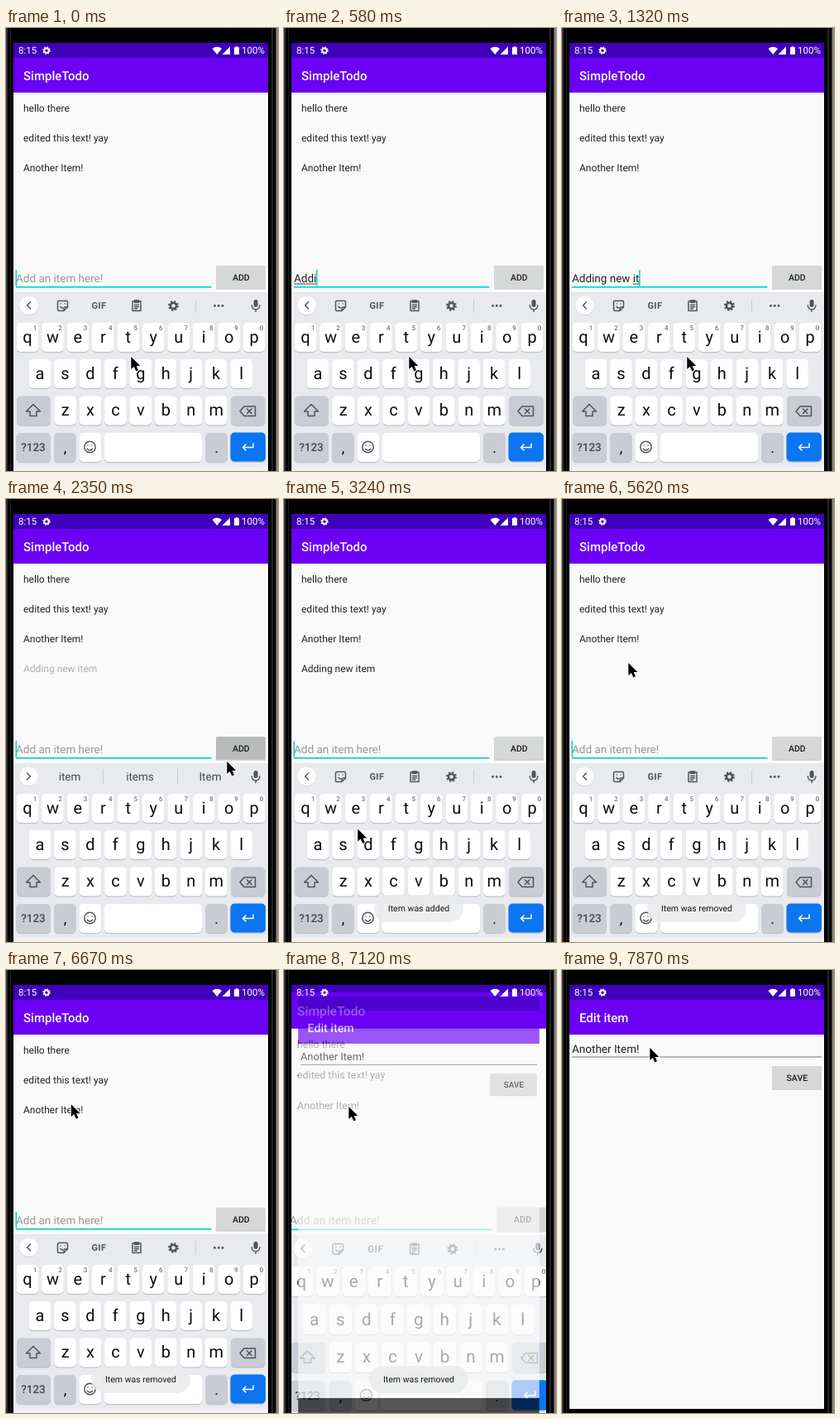
These frames come from a looping animation (329 px wide and 535 px high, 8 s). An HTML page:

```html
<!DOCTYPE html>
<html lang="en">
<head>
<meta charset="utf-8">
<title>Todo list</title>
<style>
  html, body { margin: 0; width: 100%; height: 100%; overflow: hidden; background: #000; }
  svg { display: block; width: 329px; height: 535px; font-family: Roboto, "Noto Sans", sans-serif; }
  text { white-space: pre; text-rendering: geometricPrecision; }
  .mid { text-anchor: middle; }
  .title { font-size: 15px; font-weight: 500; fill: #fff; }
  .row { font-size: 12px; fill: #212121; }
  .field { font-size: 13.5px; fill: #212121; }
  .button { font-size: 10.5px; font-weight: 500; fill: #1c1c1c; text-anchor: middle; }
  .status { font-size: 11.5px; fill: #fff; }
  .toast { font-size: 10.5px; fill: #151515; text-anchor: middle; }
  .letter { font-size: 20px; fill: #0c0c0c; text-anchor: middle; }
  .mark { font-size: 18px; }
  .digit { font-size: 8px; fill: #4c4f54; text-anchor: middle; }
  .word { font-size: 13.5px; fill: #45484d; text-anchor: middle; }
  .line { fill: none; stroke: #50545a; stroke-width: 1.5; stroke-linejoin: round; stroke-linecap: round; }
</style>
</head>
<body>
<svg viewBox="0 0 329 535" xmlns="http://www.w3.org/2000/svg">
  <defs>
    <clipPath id="screen"><rect x="9" y="18" width="308" height="517"/></clipPath>
    <linearGradient id="shade" x2="0" y2="1">
      <stop offset="0" stop-color="#000" stop-opacity=".1"/>
      <stop offset="1" stop-color="#000" stop-opacity="0"/>
    </linearGradient>
    <g id="gear" fill="none" stroke="currentColor">
      <circle r="3.1" stroke-width="2.2"/>
      <circle r="4.6" stroke-width="1.8" stroke-dasharray="1.8 1.813"/>
    </g>
    <g id="bars">
      <rect x="9" y="18" width="308" height="18" fill="#4000ba"/>
      <rect x="9" y="36" width="308" height="42" fill="#6b00f5"/>
      <rect x="9" y="78" width="308" height="3" fill="url(#shade)"/>
    </g>
    <g id="plate">
      <rect x="254" y="1" width="60" height="28" rx="1.5" fill="#000" opacity=".16"/>
      <rect x="254" width="60" height="27.5" rx="1.5" fill="currentColor"/>
    </g>
  </defs>

  <rect width="329" height="535"/>
  <rect width="2" height="535" fill="#333"/>
  <rect x="5" width="1" height="535" fill="#1f1f1f"/>
  <rect x="321" width="2" height="535" fill="#262626"/>
  <rect x="326.5" width="2.5" height="535" fill="#858585"/>

  <g clip-path="url(#screen)">
    <g id="list">
      <rect x="9" y="78" width="308" height="457" fill="#fafafa"/>
      <use href="#bars"/>
      <text class="title" x="21" y="63">SimpleTodo</text>
      <text class="row" x="21" y="100.5">hello there</text>
      <text class="row" x="21" y="136.5">edited this text! yay</text>
      <text class="row" x="21" y="172.5">Another Item!</text>
      <text class="row" x="21" y="208.5" id="added">Adding new item</text>
      <text class="field" x="12" y="306.5" id="hint" style="fill:#989898">Add an item here!</text>
      <text class="field" x="12" y="306.5" id="typed"></text>
      <rect id="compose" y="308.5" height="1" fill="#444"/>
      <rect x="12" y="312" width="236.5" height="1.7" fill="#03d8c6"/>
      <rect id="caret" y="292" width="1.6" height="19.5" fill="#03d8c6"/>
      <g id="add" color="#d6d7d7"><use href="#plate" y="287"/></g>
      <text class="button" x="284.3" y="304.8">ADD</text>

      <rect x="9" y="319" width="308" height="216" fill="#e8eaed"/>
      <rect x="9" y="530" width="308" height="5" fill="#f1f2f4"/>
      <circle cx="27.5" cy="335.5" r="11.5" fill="#c9ccd0"/>
      <circle cx="27.5" cy="335" r="11.3" fill="#fff"/>
      <path class="line" id="chevron"/>

      <g id="tools">
        <path class="line" d="M64 329.5h9q1.5 0 1.5 1.5v6l-4.500 4.500h-6q-1.500 0-1.500-1.500v-9q0-1.500 1.500-1.500zM74 337h-2.500q-1.500 0-1.500 1.500v2.500M66 336.500q1 1.500 2.500 1.500M66.300 333v.1M71 333v.1"/>
        <text class="mid" x="112.5" y="339" font-size="11" font-weight="700" letter-spacing=".5" fill="#50545a">GIF</text>
        <path class="line" d="M153 330h10v11.500h-10zM155.500 329h5v2.500h-5zM155.500 334.500h5M155.500 336.800h5M155.500 339h3"/>
        <g color="#50545a"><use href="#gear" transform="translate(202.5 335.5) scale(1.16)"/></g>
        <path d="M229.5 327v17" stroke="#cbced2"/>
        <path d="M252.5 335.5h.01m4.700 0h.01m4.700 0h.01" stroke="#50545a" stroke-width="2.9" stroke-linecap="round"/>
      </g>
      <g id="words">
        <text class="word" x="77" y="340">item</text>
        <text class="word" x="162" y="340">items</text>
        <text class="word" x="247" y="340">Item</text>
        <path d="M117.5 326v18M207.5 326v18" stroke="#cbced2"/>
      </g>
      <rect x="299.6" y="328" width="5" height="9" rx="2.5" fill="#50545a"/>
      <path class="line" d="M297.3 335q.5 5 4.800 5t4.800-5M302.100 340v2.500"/>

      <g id="keys"></g>
      <path class="line" id="shift" d="M33 454.5l8.500 8.500h-4.500v5.500h-8v-5.500h-4.500z"/>
      <path class="line" d="M288 457h13.500v11.500h-13.500l-5-5.750zM291.500 460l5.500 5.500M297 460l-5.500 5.500"/>
      <circle class="line" cx="101.5" cy="506" r="6.7"/>
      <path class="line" d="M98.3 508.2q3.200 3.500 6.400 0M99 504v.1M104 504v.1"/>
      <path class="line" style="stroke:#fff" d="M299 502v4.500h-12.500M290 503l-3.500 3.500 3.500 3.500"/>
      <text class="mid" x="33" y="511" font-size="13.5" font-weight="500" fill="#44474c">?123</text>
      <text class="letter mark" x="71.5" y="513">,</text>
      <text class="letter mark" x="254.5" y="513">.</text>
    </g>

    <g id="edit">
      <rect x="9" y="78" width="308" height="452" fill="#fafafa"/>
      <rect x="9" y="530" width="308" height="30"/>
      <use href="#bars"/>
      <text class="title" x="21" y="63">Edit item</text>
      <text class="field" x="12" y="99.5">Another Item!</text>
      <rect x="12" y="104.5" width="302" height="1" fill="#777"/>
      <g color="#d6d7d7"><use href="#plate" y="116"/></g>
      <text class="button" x="284.3" y="133.7">SAVE</text>
    </g>

    <g id="toast">
      <rect id="pill" y="478" height="33" rx="16.5" fill="#eaebec" opacity=".84"/>
      <text class="toast" id="note" x="163" y="498"></text>
    </g>

    <text class="status" x="15" y="31.3">8:15</text>
    <g color="#fff"><use href="#gear" transform="translate(49 27.2) scale(.86)"/></g>
    <path fill="#fff" d="M249.5 25q5.750-4.500 11.500 0l-5.750 7zM271 22.500v9.500h-9.500zM277.700 22.200h2.600v1.100h1.700v8.700h-6v-8.700h1.700z"/>
    <text class="status" x="285" y="31.3">100%</text>
  </g>

  <path id="mouse" d="M-.7 0v15l3.500-3 2.500 5.500 2.700-1.200-2.400-5.300h4.700z" stroke="#fff" stroke-width="1.8" stroke-linejoin="round" paint-order="stroke"/>
</svg>

<script>
const $ = id => document.getElementById(id);
const LOOP = 8000, STEP = 148.5;
const ENTRY = 'Adding new item';
const TYPED = [0, 0, 1, 2, 4, 6, 8, 10, 11, 13, 14, 15];

// Pointer stops: [step, x, y]
const PATH = [
  [0, 152, 397], [11, 152, 397], [15, 268, 317], [17, 268, 317],
  [20, 91, 438], [21, 91, 438], [25, 84, 185], [26, 83, 198],
  [34, 83, 198], [36, 81, 198], [38, 81, 198], [41, 82, 149],
  [42, 82, 147], [46, 79, 165], [48, 79, 165], [52, 107, 94], [54, 107, 94]
];
const TOASTS = [
  { text: 'Item was added', from: 17, to: 30, half: 54 },
  { text: 'Item was removed', from: 36, to: 50, half: 60 }
];

function node(parent, name, attrs, text) {
  const el = document.createElementNS('http://www.w3.org/2000/svg', name);
  for (const k in attrs) el.setAttribute(k, attrs[k]);
  if (text) el.textContent = text;
  parent.appendChild(el);
  return el;
}

function key(x, y, w, fill) {
  node($('keys'), 'rect', { x, y: y + 1.2, width: w, height: 35, rx: 5, fill: '#bfc2c7' });
  node($('keys'), 'rect', { x, y, width: w, height: 35, rx: 5, fill });
}

const letters = [];
[['qwertyuiop', 26, 356], ['asdfghjkl', 41, 400], ['zxcvbnm', 71.6, 444.5]].forEach(([row, x0, y], r) => {
  [...row].forEach((c, i) => {
    const x = x0 + i * 30.45;
    key(x - 13.3, y, 26.6, '#fff');
    letters.push(node($('keys'), 'text', { class: 'letter', x, y: Math.floor(y) + 24 }, c));
    if (!r) node($('keys'), 'text', { class: 'digit', x: x + 9, y: 365 }, String((i + 1) % 10));
  });
});
const GREY = '#c9ccd2';
key(13, 444.5, 41, GREY);
key(272, 444.5, 41.5, GREY);
key(12.5, 489, 41.5, GREY);
key(58, 489, 26.6, GREY);
key(88.5, 489, 26.6, '#fff');
key(119, 489, 118, '#fff');
key(241.3, 489, 26.6, GREY);
key(271.5, 488.5, 42.5, '#0b76f0');

const show = (id, on) => { $(id).style.display = on ? '' : 'none'; };
const clamp = v => Math.max(0, Math.min(1, v));
const zoom = (id, s, cy) =>
  $(id).setAttribute('transform', `translate(163 ${cy}) scale(${s}) translate(-163 ${-cy})`);

function pointer(n) {
  const i = PATH.findIndex(p => p[0] > n);
  const [n0, x0, y0] = PATH[i - 1], [n1, x1, y1] = PATH[i];
  const u = (n - n0) / (n1 - n0), e = u * u * (3 - 2 * u);
  $('mouse').setAttribute('transform', `translate(${x0 + (x1 - x0) * e} ${y0 + (y1 - y0) * e})`);
}

function input(n) {
  const text = n < 16 ? ENTRY.slice(0, TYPED[Math.min(n, 11)]) : '';
  $('typed').textContent = text;
  show('hint', !text);
  const end = text ? 12 + $('typed').getComputedTextLength() : 12;
  $('caret').setAttribute('x', end - .5);
  const phase = ((n * STEP - 4250) % 1000 + 1000) % 1000;
  show('caret', n < 16 ? n < 15 : phase < 505);

  const start = text.lastIndexOf(' ') + 1;
  const composing = start < text.length;
  show('compose', composing);
  if (composing) {
    const x = start ? 12 + $('typed').getSubStringLength(0, start) : 12;
    $('compose').setAttribute('x', x);
    $('compose').setAttribute('width', end - x);
  }
}

function keyboard(n) {
  const caps = n === 1 || n === 2;
  letters.forEach(l => {
    l.textContent = caps ? l.textContent.toUpperCase() : l.textContent.toLowerCase();
  });
  $('shift').style.fill = caps ? '#50545a' : 'none';
  const words = n >= 11 && n <= 16;
  show('words', words);
  show('tools', !words);
  $('chevron').setAttribute('d', words ? 'M25.5 331l4 4-4 4' : 'M29.5 331l-4 4 4 4');
}

function toast(n) {
  const item = TOASTS.find(t => n >= t.from && n < t.to + 3);
  show('toast', item);
  if (!item) return;
  const rise = clamp((n - item.from + .6) / 2);
  const fade = clamp((item.to + 2.5 - n) / 2.5);
  $('note').textContent = item.text;
  $('pill').setAttribute('x', 163 - item.half);
  $('pill').setAttribute('width', item.half * 2);
  $('toast').setAttribute('opacity', rise * fade);
  $('toast').setAttribute('transform', `translate(0 ${12 * (1 - rise) ** 2})`);
}

function openEditor(n) {
  const k = n - 48;
  show('edit', k >= 0);
  show('list', k < 4);
  zoom('list', k < 0 ? 1 : 1.035 + .025 * k, 295);
  zoom('edit', k < 4 ? 1 - .053 * Math.exp(-1.65 * k) : 1, 284);
  $('edit').setAttribute('opacity', k > 0 ? 1 : .66);
}

function draw(t) {
  const n = Math.min(53, Math.floor((t + 32) / 148.7));
  pointer(n);
  input(n);
  keyboard(n);
  $('added').setAttribute('opacity', n < 16 || n > 35 ? 0 : n === 16 ? .35 : n === 35 ? .4 : 1);
  $('add').setAttribute('color', n === 15 || n === 16 ? '#b9bbbb' : '#d6d7d7');
  toast(n);
  openEditor(n);
}

const began = performance.now();
function tick() {
  draw((performance.now() - began) % LOOP);
  requestAnimationFrame(tick);
}
tick();
</script>
</body>
</html>
```
